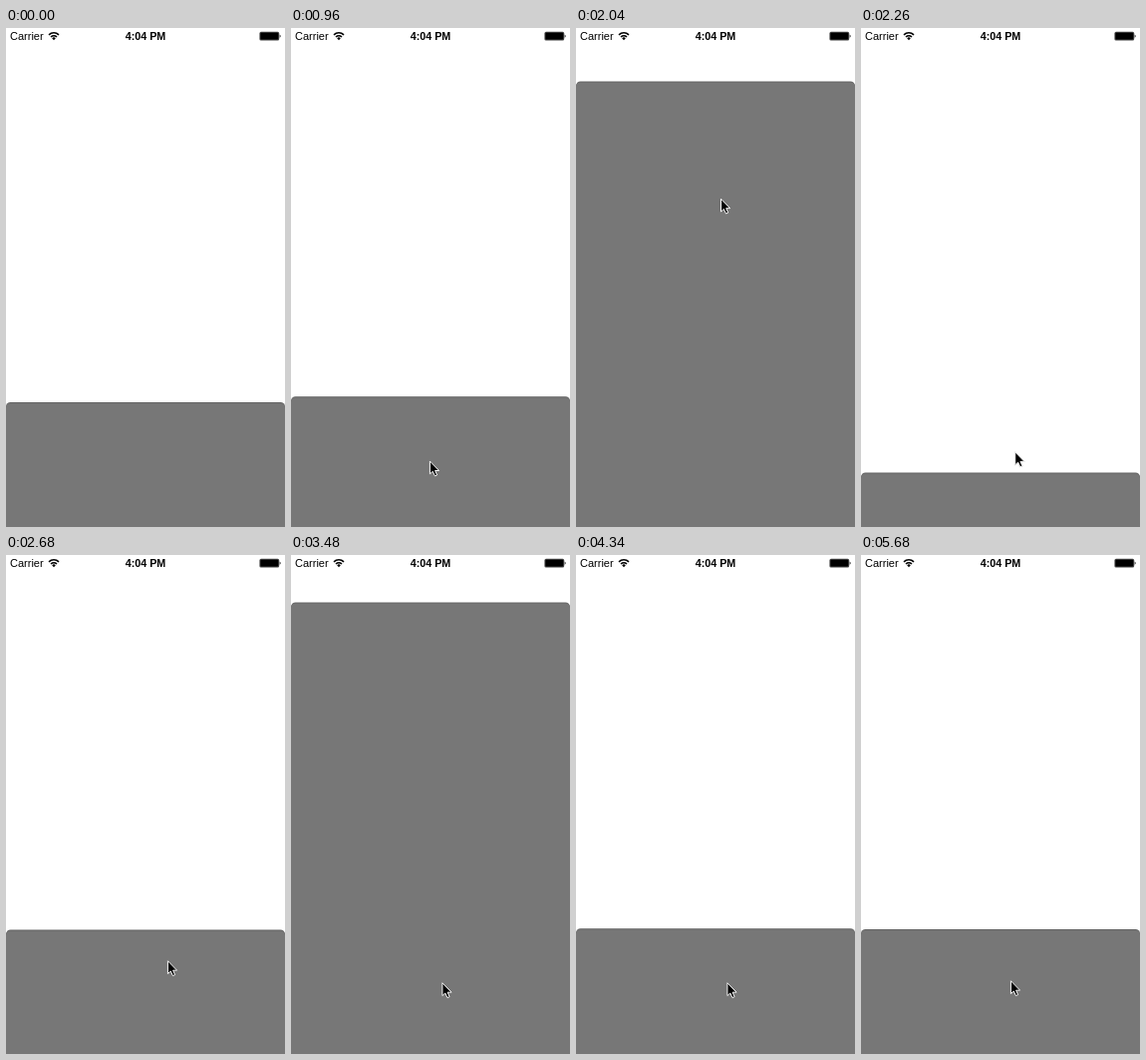
An HTML page that plays this animation: 280 px wide and 500 px high, repeating every 5.7 s.

```html
<!DOCTYPE html>
<html lang="en">
<head>
<meta charset="utf-8">
<title>Spring pane</title>
<style>
  html, body { margin: 0; width: 100%; height: 100%; overflow: hidden; background: #fff; }
  svg { display: block; width: 280px; height: 500px; }
  text { font-family: "Liberation Sans", Arial, sans-serif; }
  #cursor { filter: drop-shadow(0 .7px .6px #0006); }
</style>
</head>
<body>
<svg viewBox="0 0 280 500">
  <g id="pane">
    <rect width="280" height="500" rx="4.5" fill="#626262"/>
    <rect y="1" width="280" height="499" rx="4.5" fill="#777"/>
  </g>

  <text x="4" y="12" font-size="11">Carrier</text>
  <g fill="none" stroke="#000" stroke-width="1.6">
    <path d="M43 6.8A7.3 7.3 0 0 1 53 6.8"/>
    <path d="M45 9A4.4 4.4 0 0 1 51 9"/>
  </g>
  <path d="M48 12.2L46.2 10.3A2.5 2.5 0 0 1 49.8 10.3Z"/>
  <text x="140" y="12" font-size="10.75" font-weight="bold" text-anchor="middle">4:04 PM</text>
  <rect x="254.4" y="3.8" width="19.8" height="8.7" rx="1.6" fill="#444"/>
  <rect x="255.4" y="4.8" width="17.8" height="6.7" rx="1"/>
  <path d="M274.6 6.4Q276.8 8.1 274.6 9.8Z" fill="#222"/>

  <path id="cursor" d="M.4 .7V13.6L3.3 11L5.4 15.6L7.6 14.7L5.6 10.2H9.6Z"
        stroke="#fff" stroke-width="1" stroke-linejoin="round"/>
</svg>
<script>
const LOOP = 5700, STEP = 20;
const CLOSED = 375, OPEN = 44;
const OMEGA = 16, ZETA = 0.63;

const linear = u => u;
const smooth = u => u * u * (3 - 2 * u);
const easeIn = p => u => u ** p;
const easeOut = p => u => 1 - (1 - u) ** p;

// Pointer stops: time, x, y, easing of the way there
const stops = [
  [380, 150, 498.5],
  [880, 139, 439, smooth],
  [950, 139, 439, linear],
  [1116, 139, 164, easeIn(1.38)],
  [1200, 139, 149, easeOut(2.5)],
  [1280, 139, 149, linear],
  [2018, 145, 161, linear],
  [2100, 147, 356, easeIn(2.3)],
  [2200, 154, 425, easeOut(3)],
  [2680, 162, 406, smooth],
  [2960, 151.5, 428, smooth],
  [5460, 151.5, 428, linear],
  [5520, 149.5, 430, linear],
  [5660, 149.5, 430, linear],
  [5680, 150, 426, linear],
  [LOOP, 150, 426, linear]
];

function pointerAt(t) {
  if (t >= 20 && t < 180) return { x: 150, y: 498.5 };
  if (t < stops[0][0]) return { x: 150, y: 520 };
  const i = stops.findIndex(stop => t < stop[0]);
  const [t0, x0, y0] = stops[i - 1], [t1, x1, y1, ease] = stops[i];
  const k = ease((t - t0) / (t1 - t0));
  return { x: x0 + (x1 - x0) * k, y: y0 + (y1 - y0) * k };
}

// Damped spring: position and velocity at time t
function springAt({ start, target, pos, vel }, t) {
  const s = (t - start) / 1000;
  const sigma = OMEGA * ZETA, wd = OMEGA * Math.sqrt(1 - ZETA * ZETA);
  const a = pos - target, b = (vel + sigma * a) / wd;
  const decay = Math.exp(-sigma * s), c = Math.cos(wd * s), n = Math.sin(wd * s);
  return {
    pos: target + decay * (a * c + b * n),
    vel: decay * ((b * wd - sigma * a) * c - (a * wd + sigma * b) * n)
  };
}

const phases = [{ start: 0, target: CLOSED, pos: CLOSED, vel: 0 }];

function drag(start, end, from, target) {
  const grab = from - pointerAt(start).y;
  const y = pointerAt(end - 0.01).y;
  const vel = (y - pointerAt(end - 1).y) / 0.99 * 1000;
  phases.push({ start, grab }, { start: end, target, pos: y + grab, vel });
}

function tap(start, target) {
  phases.push({ start, target, ...springAt(phases.at(-1), start) });
}

drag(950, 1116, CLOSED, OPEN);
drag(2018, 2100, OPEN, CLOSED);
tap(3250, OPEN);
tap(3452, CLOSED);
tap(3651, OPEN);
tap(3893, CLOSED);

function paneAt(t) {
  const phase = phases.findLast(p => p.start <= t);
  return "grab" in phase ? pointerAt(t).y + phase.grab : springAt(phase, t).pos;
}

const pane = document.getElementById("pane");
const cursor = document.getElementById("cursor");

function draw(now) {
  const t = Math.floor((now % LOOP) / STEP) * STEP;
  const { x, y } = pointerAt(t);
  pane.setAttribute("transform", `translate(0 ${paneAt(t).toFixed(2)})`);
  cursor.setAttribute("transform", `translate(${x.toFixed(2)} ${y.toFixed(2)})`);
}

const began = performance.now();
function frame() {
  draw(performance.now() - began);
  requestAnimationFrame(frame);
}
frame();
</script>
</body>
</html>
```
